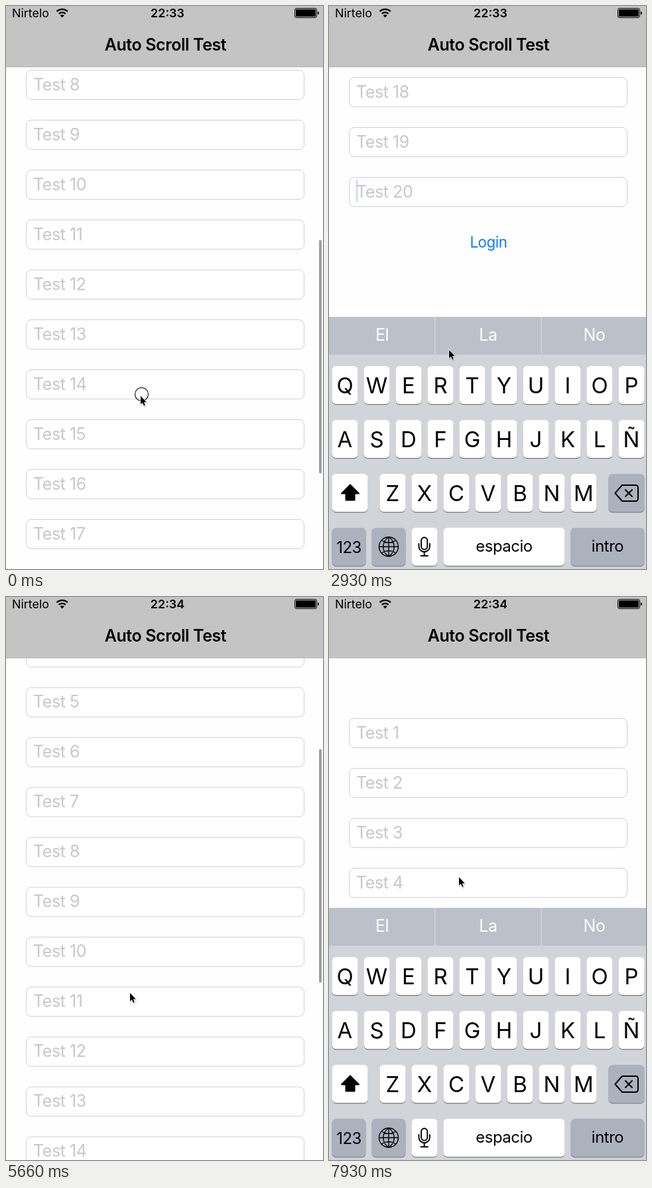
These frames come from a looping animation (478 by 846 pixels, 7990 ms). An HTML page:

```html
<!DOCTYPE html>
<html lang="en">
<head>
<meta charset="utf-8">
<title>Auto Scroll Test</title>
<style>
  html, body { margin: 0; width: 100%; height: 100%; overflow: hidden; background: #fefefe; }
  svg { display: block; width: 100%; height: 100%; }
  text { font-family: Inter, Roboto, sans-serif; font-optical-sizing: none; white-space: pre; }
  .mid { text-anchor: middle; }
  .body { font-size: 25px; letter-spacing: -.42px; }
  .status { font-size: 17.9px; }
  .bold { font-weight: 600; }
  .hint { fill: #c7c7cc; }
  .login { font-size: 22.4px; letter-spacing: -.45px; fill: #0a7cff; }
  .key { font-size: 33px; }
  .word { font-size: 23.9px; letter-spacing: -.45px; }
  .line { fill: none; stroke: #000; stroke-linecap: round; stroke-linejoin: round; }
</style>
</head>
<body>
<svg viewBox="0 0 478 846" preserveAspectRatio="none">
  <rect width="478" height="846" fill="#fefefe"/>
  <g id="list"></g>
  <rect id="bar" x="472" width="4" rx="2" opacity="0"/>
  <g id="keyboard">
    <rect y="467" width="478" height="379" fill="#d1d5da"/>
    <path d="M0 467.5H159V524H0ZM160.5 467.5H319.5V524H160.5ZM321 467.5H478V524H321Z" fill="#bac1c9"/>
  </g>
  <g id="header">
    <rect width="478" height="91.5" fill="#c4c4c4"/>
    <rect y="91" width="478" height="1" fill="#b2b2b2"/>
    <text class="status" x="9" y="17">Nirtelo</text>
    <g class="line" style="stroke-linecap:butt" stroke-width="2.3">
      <path d="M76.5 8.2A12 12 0 0 1 92.9 8.2M79.7 11.7A7.2 7.2 0 0 1 89.7 11.7"/>
    </g>
    <path d="M84.7 17.4L81.7 14.3A4.2 4.2 0 0 1 87.7 14.3Z"/>
    <text id="clock" class="status bold mid" x="243.5" y="17"></text>
    <rect x="435.5" y="3.5" width="33" height="14" rx="2.5" fill="none" stroke="#000"/>
    <rect x="437" y="5" width="30" height="11" rx="1"/>
    <path d="M470 8V13Q472 12.5 472 10.5T470 8Z"/>
    <text class="body bold mid" x="240.5" y="67">Auto Scroll Test</text>
  </g>
  <circle id="touch" r="10" fill="none" stroke="#000" stroke-width="1.1"/>
  <g id="mouse">
    <path d="M.5 1V13.6L3.4 11.1L5.4 15.8L7.3 15L5.4 10.3H9.3Z" transform="translate(.5 1.3)" opacity=".18" stroke="#000" stroke-width="1.6"/>
    <path d="M.5 1V13.6L3.4 11.1L5.4 15.8L7.3 15L5.4 10.3H9.3Z" stroke="#fff" stroke-width="1.4" paint-order="stroke"/>
  </g>
</svg>
<script>
const LOOP = 7990, GAP = 75, END = 850;
const $ = id => document.getElementById(id);

function add(parent, tag, attrs, text) {
  const el = document.createElementNS('http://www.w3.org/2000/svg', tag);
  for (const k in attrs) el.setAttribute(k, attrs[k]);
  if (text) el.textContent = text;
  parent.appendChild(el);
  return el;
}

// Form fields, laid out at zero scroll
const list = $('list'), board = $('keyboard');
for (let n = 1; n <= 20; n++) {
  const y = 121 + (n - 1) * GAP;
  add(list, 'rect', { x: 30.5, y: y + .5, width: 419, height: 44, rx: 7.5, fill: '#fff', stroke: '#d0d0d0' });
  add(list, 'text', { x: 41, y: y + 30.5, class: 'body hint' }, 'Test ' + n);
}
add(list, 'text', { x: 240.5, y: 121 + 19 * GAP + 106, class: 'login mid' }, 'Login');
const caret = add(list, 'rect', { x: 40.5, width: 3, height: 33, rx: 1, fill: '#4669e4' });

// Keyboard
function key(x, y, w, label, cls = 'key', base = 41, fill = '#fff') {
  add(board, 'rect', { x, y: y + 1.6, width: w, height: 57, rx: 6, fill: '#898c91' });
  add(board, 'rect', { x, y, width: w, height: 57, rx: 6, fill });
  if (label) add(board, 'text', { x: x + w / 2, y: y + base, class: cls + ' mid' }, label);
}
const row = (chars, x, y) => [...chars].forEach((c, i) => key(x + i * 48, y, 39, c));
const icon = (d, width) => add(board, 'path', { d, class: 'line', 'stroke-width': width });
const GREY = '#acb2bd';

['El', 'La', 'No'].forEach((w, i) =>
  add(board, 'text', { x: 80 + i * 160, y: 502.5, class: 'body mid', fill: '#fff' }, w));
row('QWERTYUIOP', 4.5, 541);
row('ASDFGHJKLÑ', 4.5, 622);
row('ZXCVBNM', 76.5, 703);
key(4.5, 703, 54);
key(421.5, 703, 54, '', '', 0, GREY);
key(4.5, 784, 51, '123', 'word', 38, GREY);
key(64.5, 784, 51, '', '', 0, GREY);
key(124.5, 784, 39);
key(172.5, 784, 183, 'espacio', 'word', 36);
key(364.5, 784, 111, 'intro', 'word', 36, GREY);
icon('M32 719.5L45 732.5H38.5V742.5H25.5V732.5H19Z', 2).style.fill = '#000';
icon('M442 720H462Q466 720 466 724V740Q466 744 462 744H442L431.5 732ZM447 727L457 737M457 727L447 737', 2);
icon('M75.5 812.5a14.5 14.5 0 1 1 29 0a14.5 14.5 0 1 1 -29 0ZM90 798V827M75.5 812.5H104.5' +
  'M90 798C79 805 79 820 90 827C101 820 101 805 90 798M79 803Q90 810 101 803M79 822Q90 815 101 822', 1.4);
icon('M143.7 798.5a4.6 4.6 0 0 1 4.6 4.6V812a4.6 4.6 0 0 1 -9.2 0V803.1a4.6 4.6 0 0 1 4.6 -4.6Z' +
  'M135.5 808V812a8.2 8.2 0 0 0 16.4 0V808M143.7 820.5V826M138.5 826.2H149', 1.9);

const clamp = v => Math.max(0, Math.min(1, v));
const span = (t, a, b) => clamp((t - a) / (b - a));
const ease = {
  lin: p => p,
  in: p => p * p,
  out: p => 1 - (1 - p) ** 2,
  both: p => p * p * (3 - 2 * p)
};
const slide = (t, a, b) => 1 - (1 - span(t, a, b)) ** 3;

// Pointer path: time, x, y, easing on the way there
const path = [
  [0, 202.5, 585],
  [30, 202.5, 585, 'lin'],
  [250, 222, 330, 'lin'],
  [500, 228.5, 308.5, 'out'],
  [870, 228.5, 308.5, 'lin'],
  [1640, 178, 723.5, 'both'],
  [1750, 177.5, 724.5, 'lin'],
  [2650, 177.5, 724.5, 'lin'],
  [2870, 179, 634, 'in'],
  [2930, 180.5, 517, 'lin'],
  [3100, 188, 290, 'lin'],
  [3460, 195, 199, 'out'],
  [3850, 195, 199, 'lin'],
  [4230, 183.5, 243, 'both'],
  [4400, 183.5, 243, 'lin'],
  [4580, 184.5, 234, 'both'],
  [5300, 184.5, 234, 'lin'],
  [5540, 186, 568, 'in'],
  [5660, 186.5, 594, 'out'],
  [6100, 186.5, 594, 'lin'],
  [6670, 186.5, 256.5, 'both'],
  [6910, 190, 218, 'out'],
  [7400, 190, 218, 'lin'],
  [7860, 195.5, 420, 'both']
];
function pointer(t) {
  const i = path.findIndex(k => k[0] > t);
  if (i < 0) return path[path.length - 1].slice(1, 3);
  const a = path[i - 1], b = path[i], p = ease[b[3]](span(t, a[0], b[0]));
  return [a[1] + (b[1] - a[1]) * p, a[2] + (b[2] - a[2]) * p];
}

const touches = [[0, 250], [2110, 2200], [3640, 3730], [4760, 4850], [5300, 5540], [6970, 7060]];
const focus = [[2130, 3700, 20], [3740, 4790, 19], [7090, LOOP, 2]];

// Critically damped edge bounce
const bounce = (age, speed) => speed * age * Math.exp(-.009 * age);

function scroll(t) {
  if (t < 250) return 550 + 585 - pointer(t)[1];
  if (t < 285) return 805 + (t - 250) * 45 / 35;
  if (t < 2170) return END + bounce(t - 285, 1.2);
  if (t < 3720) return END + 439 * slide(t, 2170, 2700);
  if (t < 4780) return 1289 - 75 * slide(t, 3720, 4200);
  if (t < 5300) return 1214 - 364 * slide(t, 4780, 5140);
  if (t < 5540) return END + 234 - pointer(t)[1];
  if (t < 5868) return 516 - 1073 * (1 - Math.exp(-.002 * (t - 5540)));
  if (t < 7060) return -bounce(t - 5868, 1.12);
  return -61 * slide(t, 7060, 7560);
}

function keyboardUp(t) {
  if (t < 4780) return slide(t, 2170, 2700);
  if (t < 7060) return 1 - slide(t, 4780, 5140);
  return slide(t, 7060, 7560);
}

function blink(age) {
  return age < 1000 ? 1 - span(age, 680, 840) : span(age, 1130, 1290);
}

function barAlpha(t) {
  if (t < 2000) return 1 - span(t, 1250, 1500);
  return span(t, 5290, 5340) * (1 - span(t, 6460, 6720));
}

function draw(t) {
  const s = scroll(t), [x, y] = pointer(t);
  list.setAttribute('transform', `translate(0 ${-s})`);
  board.setAttribute('transform', `translate(0 ${379 * (1 - keyboardUp(t))})`);
  $('clock').textContent = t < 4760 ? '22:33' : '22:34';

  const over = Math.max(0, -s, s - END);
  const bar = $('bar');
  bar.setAttribute('y', 96 + clamp(s / END) * 395 + (s > END ? over : 0));
  bar.setAttribute('height', Math.max(10, 351 - over));
  bar.setAttribute('opacity', .38 * barAlpha(t));

  const f = focus.find(([a, b]) => t >= a && t < b);
  caret.setAttribute('opacity', f ? blink(t - f[0]) : 0);
  if (f) caret.setAttribute('y', 125 + (f[2] - 1) * GAP);

  const down = touches.some(([a, b]) => t >= a && t < b);
  $('mouse').setAttribute('transform', `translate(${x} ${y})`);
  $('touch').setAttribute('transform', `translate(${x + 2} ${y - 1.5})`);
  $('touch').setAttribute('visibility', down ? 'visible' : 'hidden');
}

const start = performance.now();
function tick() {
  draw((performance.now() - start) % LOOP);
  requestAnimationFrame(tick);
}
tick();
</script>
</body>
</html>
```
